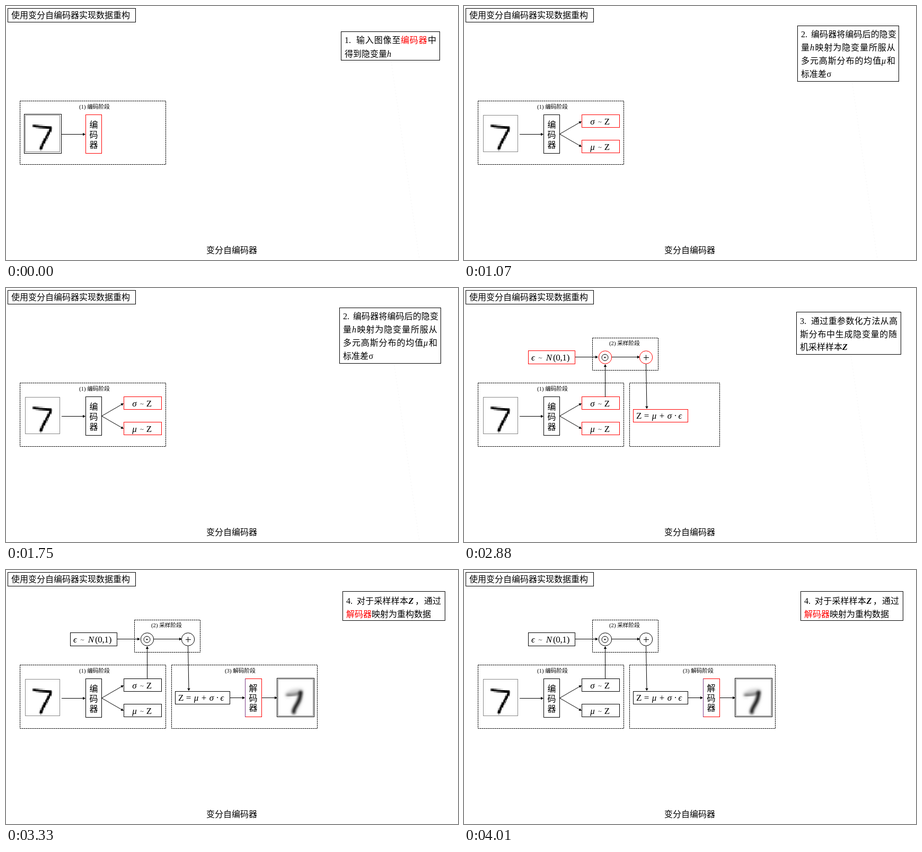
An HTML page that plays this animation: 853 by 480 pixels, repeating every 4.46 s.

```html
<!DOCTYPE html>
<html lang="zh-CN">
<head>
<meta charset="utf-8">
<title>变分自编码器</title>
<style>
  html, body { margin: 0; width: 100%; height: 100%; overflow: hidden; background: #fff; }
  svg { display: block; width: 853px; height: 480px; }
  text { font-family: "Liberation Serif", "Noto Sans CJK SC", "Noto Sans CJK", "Noto Sans CJK JP", serif; font-weight: 300; white-space: pre; }
  .math { font-family: "Liberation Serif", "DejaVu Sans", serif; text-anchor: middle; }
  .it { font-style: italic; }
  .bold { font-style: italic; font-weight: bold; }
  .sim { font-size: 14px; }
</style>
</head>
<body>
<svg id="stage" viewBox="0 0 853 480">
  <defs>
    <filter id="soft" x="-50%" y="-50%" width="200%" height="200%"><feGaussianBlur stdDeviation="2"/></filter>
    <filter id="haze" x="-50%" y="-50%" width="200%" height="200%"><feGaussianBlur stdDeviation="3"/></filter>
  </defs>
</svg>
<script>
const NS = 'http://www.w3.org/2000/svg';
const stage = document.getElementById('stage');
const LOOP = 4460, STARTS = [0, 1070, 2200, 3330];
const RED = '#f00', BLACK = '#000';
const parts = [], accents = [];

function el(parent, tag, attrs, body) {
  const node = document.createElementNS(NS, tag);
  for (const key in attrs) node.setAttribute(key, attrs[key]);
  if (body !== undefined) node.textContent = body;
  return parent.appendChild(node);
}

// A group visible from step `from` to step `to`, inclusive.
function group(from = 0, to = 3) {
  const node = el(stage, 'g', {});
  parts.push({ node, from, to });
  return node;
}

function box(g, x, y, x2, y2, extra = {}) {
  return el(g, 'rect', { x: x + .5, y: y + .5, width: x2 - x, height: y2 - y, fill: '#fff', stroke: BLACK, ...extra });
}

const dashed = (g, x, y, x2, y2) => box(g, x, y, x2, y2, { fill: 'none', 'stroke-dasharray': '3 1' });

// Outline that is red from step `from` to step `to`, inclusive.
function accent(node, from, to = from) {
  accents.push({ node, from, to });
}

function label(g, x, mid, str, { size = 16, gap = 0, fill = BLACK, cls = '' } = {}) {
  return el(g, 'text', { x, y: mid + size * .37, 'font-size': size, 'letter-spacing': gap, fill, class: cls }, str);
}

function column(g, x, mids, str) {
  [...str].forEach((ch, i) => label(g, x - 8, mids[i], ch));
}

function math(g, y, runs) {
  for (const [x, str, cls = ''] of runs) el(g, 'text', { x, y, 'font-size': 17, class: 'math ' + cls }, str);
}

function arrow(g, x1, y1, x2, y2) {
  const len = Math.hypot(x2 - x1, y2 - y1), ux = (x2 - x1) / len, uy = (y2 - y1) / len;
  const bx = x2 - ux * 5, by = y2 - uy * 5;
  el(g, 'path', { d: `M${x1} ${y1}L${bx} ${by}`, stroke: BLACK });
  el(g, 'path', { d: `M${x2} ${y2}L${bx - uy * 2.7} ${by + ux * 2.7}L${bx + uy * 2.7} ${by - ux * 2.7}Z` });
}

function distance(px, py, [ax, ay], [bx, by]) {
  const dx = bx - ax, dy = by - ay;
  const t = Math.max(0, Math.min(1, ((px - ax) * dx + (py - ay) * dy) / (dx * dx + dy * dy)));
  return Math.hypot(px - ax - t * dx, py - ay - t * dy);
}

// Handwritten seven, sampled on a 28 by 28 grid.
function digit(g) {
  const pen = [[7, 8], [12, 8.6], [20.3, 9.2], [20.2, 11], [17.2, 16.5], [14.3, 21.5], [12.7, 25.2]];
  const w = 66 / 28, h = 69 / 28;
  for (let j = 0; j < 28; j++) for (let i = 0; i < 28; i++) {
    let d = 99;
    for (let k = 1; k < pen.length; k++) d = Math.min(d, distance(i + .5, j + .5, pen[k - 1], pen[k]));
    const ink = Math.max(0, Math.min(1, 1.35 - d + j * .01));
    if (ink < .04) continue;
    const c = Math.round(255 * (1 - ink));
    el(g, 'rect', { x: 36 + i * w, y: 207 + j * h, width: w + .1, height: h + .1, fill: `rgb(${c},${c},${c})`, 'shape-rendering': 'crispEdges' });
  }
}

let g = group(0, 2);
el(g, 'path', { d: 'M727 105L780 478', stroke: '#f5f5f5', 'stroke-dasharray': '2 4', fill: 'none' });

// Title and caption
g = group();
box(g, 3, 4, 244, 30);
label(g, 10, 17, '使用变分自编码器实现数据重构');
label(g, 378, 461.5, '变分自编码器');

// Encoding stage
dashed(g, 26, 179, 301, 299);
label(g, 138, 190, '(1) 编码阶段', { size: 10.7 });
box(group(0, 0), 34, 204, 104, 278);
g = group();
box(g, 36, 206, 101, 275, { stroke: '#888' });
digit(g);
arrow(g, 105, 242.5, 150, 242.5);
accent(box(g, 150, 205, 180, 278), 0);
column(g, 165.5, [224.5, 243, 262], '编码器');

g = group(1);
arrow(g, 180.5, 242, 222, 218);
arrow(g, 180.5, 242, 222, 266);
accent(box(g, 222, 205, 293, 229), 1, 2);
accent(box(g, 222, 253, 293, 277), 1, 2);
math(g, 223.5, [[242.5, 'σ', 'it'], [256.5, '∼', 'sim'], [270, 'Z']]);
math(g, 271.5, [[242.5, 'μ', 'it'], [256.5, '∼', 'sim'], [270, 'Z']]);

// Sampling stage
g = group(2);
dashed(g, 242, 94, 366, 155);
label(g, 274, 104, '(2) 采样阶段', { size: 10.7 });
accent(box(g, 121, 118, 209, 143), 2);
math(g, 137, [[130.5, 'ϵ', 'it'], [144, '∼', 'sim'], [160.5, 'N', 'it'], [170.8, '('], [177.5, '0'], [183.5, ','], [189.5, '1'], [196.5, ')']]);
arrow(g, 210, 130.5, 253, 130.5);
arrow(g, 278.5, 130.5, 332, 130.5);
for (const x of [266.5, 343.5]) accent(el(g, 'circle', { cx: x, cy: 131, r: 12.2, fill: '#fff', stroke: BLACK }), 2);
el(g, 'circle', { cx: 266, cy: 131.3, r: 6, fill: 'none', stroke: BLACK });
el(g, 'circle', { cx: 266, cy: 131.3, r: 1.3 });
el(g, 'path', { d: 'M339 131.5H349M343.5 126.5V136.5', stroke: BLACK });
arrow(g, 266.5, 206, 266.5, 144);
arrow(g, 343.5, 143.5, 345, 228.5);
accent(box(g, 319, 229, 422, 253), 2);
math(g, 246.5, [[330.2, 'Z'], [344.5, '='], [359, 'μ', 'it'], [373.5, '+'], [388, 'σ', 'it'], [399, '·'], [408, 'ϵ', 'it']]);

// Decoding stage
dashed(group(2, 2), 312, 179, 482, 299);
g = group(3);
dashed(g, 312, 179, 587, 299);
label(g, 413, 190, '(3) 解码阶段', { size: 10.7 });
arrow(g, 423, 241.5, 451, 241.5);
box(g, 451, 205, 482, 277, { stroke: RED });
el(g, 'path', { d: 'M451.5 205V278', stroke: '#7a3a86' });
column(g, 466.5, [223.5, 242, 260.5], '解码器');
box(g, 511, 204, 581, 277);
box(g, 513, 206, 579, 275, { stroke: '#888' });
arrow(g, 483, 241.5, 512, 241.5);
const ink = { fill: 'none', 'stroke-linecap': 'round', 'stroke-linejoin': 'round' };
el(g, 'path', { d: 'M532 236Q538 229 556 229L553 247L543 268', stroke: '#ccc', 'stroke-width': 9, filter: 'url(#haze)', ...ink });
el(g, 'path', { d: 'M531 236.5Q543 237 556 232', stroke: '#777', 'stroke-width': 5, filter: 'url(#soft)', ...ink });
el(g, 'path', { d: 'M556 231Q556 243 549 254T543 269', stroke: '#111', 'stroke-width': 6, filter: 'url(#soft)', ...ink });

// Step notes
g = group(0, 0);
box(g, 632, 48, 818, 102);
label(g, 639, 64.5, '1.');
label(g, 661, 64.5, '输入图像至', { gap: .85 });
label(g, 745, 64.5, '编码器', { gap: .85, fill: RED });
label(g, 796, 64.5, '中');
label(g, 639, 90.5, '得到隐变量');
label(g, 719, 90.5, 'h', { cls: 'it' });

g = group(1, 1);
box(g, 629, 37, 820, 142);
label(g, 636, 53.5, '2.');
label(g, 655, 53.5, '编码器将编码后的隐变', { gap: .1 });
label(g, 636, 78.5, '量');
label(g, 653, 78.5, 'h', { cls: 'it' });
label(g, 662.5, 78.5, '映射为隐变量所服从', { gap: .9 });
label(g, 636, 103, '多元高斯分布的均值', { gap: .9 });
label(g, 788, 103, 'μ', { cls: 'it' });
label(g, 798, 103, '和');
label(g, 636, 128, '标准差');
label(g, 684.5, 128, 'σ');

g = group(2, 2);
box(g, 627, 45, 824, 125);
label(g, 634, 62, '3.');
label(g, 655, 62, '通过重参数化方法从高', { gap: .35 });
label(g, 634, 87, '斯分布中生成隐变量的随', { gap: .7 });
label(g, 634, 111, '机采样样本');
label(g, 714, 111, 'Z', { cls: 'bold' });

g = group(3, 3);
box(g, 635, 40, 828, 95);
label(g, 642, 58, '4.');
label(g, 662, 58, '对于采样样本', { gap: .2 });
label(g, 759.5, 58, 'Z', { cls: 'bold' });
label(g, 772, 58, '，');
label(g, 789, 58, '通过');
label(g, 642, 83, '解码器', { fill: RED });
label(g, 690, 83, '映射为重构数据');

let shown = -1;
function draw(ms) {
  const t = ms % LOOP;
  const step = STARTS.filter(s => s <= t).length - 1;
  if (step === shown) return;
  shown = step;
  const during = ({ from, to }) => step >= from && step <= to;
  for (const p of parts) p.node.setAttribute('display', during(p) ? 'inline' : 'none');
  for (const a of accents) a.node.setAttribute('stroke', during(a) ? RED : BLACK);
}

const begin = performance.now();
function tick() {
  draw(performance.now() - begin);
  requestAnimationFrame(tick);
}
tick();
</script>
</body>
</html>
```
